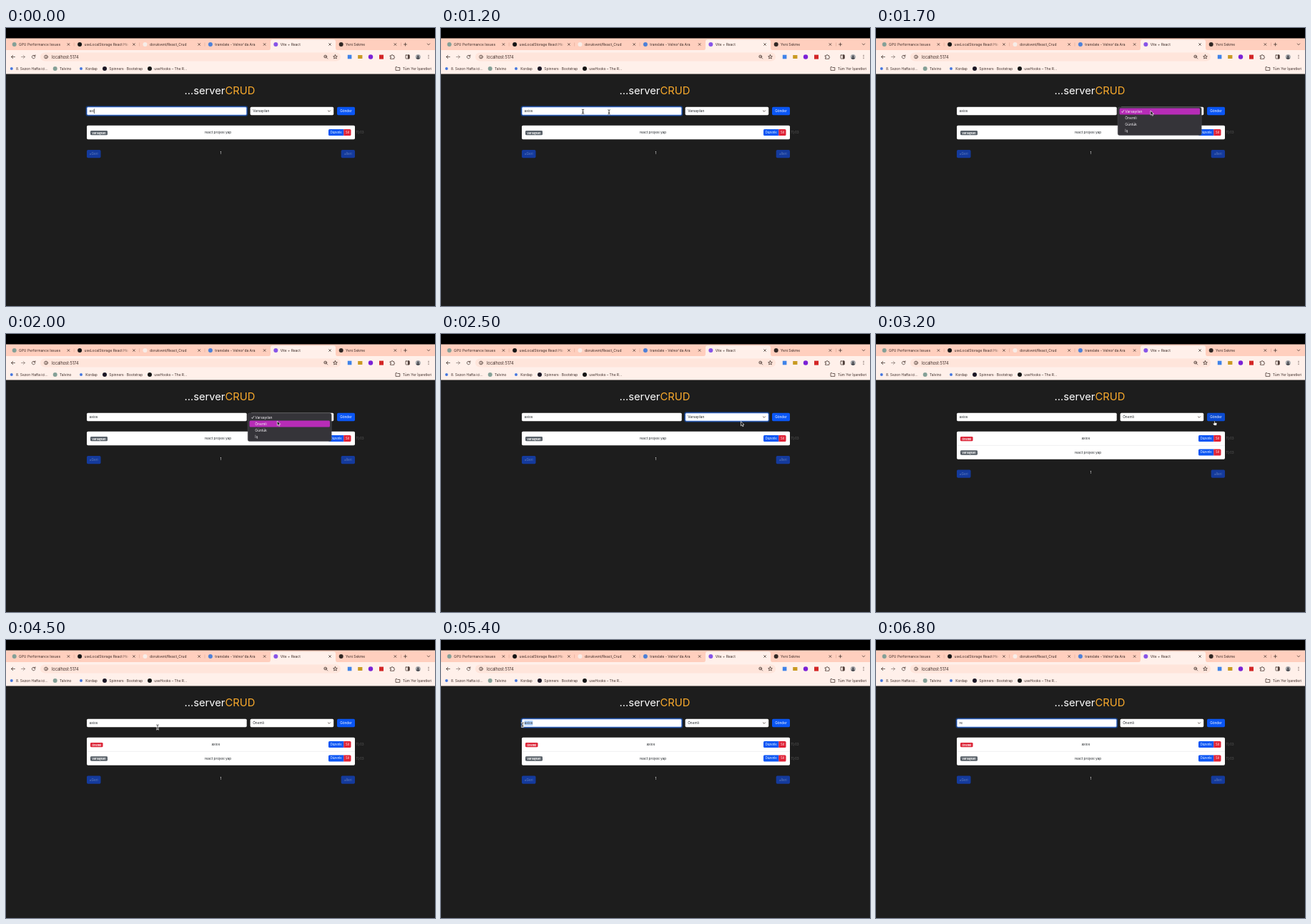
Animation, 600 px wide and 390 px high, one loop 7 s. Source, as an HTML page:

```html
<!DOCTYPE html>
<html lang="tr">
<head>
<meta charset="utf-8">
<title>CRUD</title>
<style>
html, body { margin: 0; width: 100%; height: 100%; overflow: hidden; background: #1d1d1d; }
svg { display: block; width: 100vw; height: 100vh; }
text { font: 4.75px Inter, Roboto, sans-serif; fill: #212529; white-space: pre; }
.chrome text { font-size: 4.9px; fill: #3a2a26; }
.chrome .url { font-size: 5.6px; }
.icon { fill: none; stroke: #40302b; stroke-width: .75; stroke-linecap: round; stroke-linejoin: round; }
.title { font-size: 14.7px; fill: #fff; }
.mid { text-anchor: middle; }
.light { fill: #fff; }
.badge { font-size: 3.75px; font-weight: 700; fill: #fff; text-anchor: middle; }
.small { font-size: 4.2px; fill: #fff; text-anchor: middle; }
.date { font-size: 4.6px; fill: #595959; }
.dim { font-size: 4.7px; fill: #6680bd; text-anchor: middle; }
.menu text { font-size: 5px; fill: #f4f2f5; }
.ring { fill: none; stroke: #0d6efd; stroke-opacity: .35; stroke-width: 2; }
.ring + .edge { fill: none; stroke: #2a62dc; stroke-width: .6; }
</style>
</head>
<body>
<svg viewBox="0 0 600 390" preserveAspectRatio="none">
  <defs>
    <linearGradient id="fade">
      <stop stop-color="#ffcfbe" stop-opacity="0"/><stop offset="1" stop-color="#ffcfbe"/>
    </linearGradient>
    <g id="ibeam" fill="none" stroke-linecap="round">
      <path id="beam" d="M-1.3-3.2Q0-3.2 0-2.4Q0-3.2 1.3-3.2M0-2.4V2.4M-1.3 3.2Q0 3.2 0 2.4Q0 3.2 1.3 3.2M-.8 .8H.8" stroke="#fff" stroke-width="1.5"/>
      <use href="#beam"/>
      <path d="M-1.3-3.2Q0-3.2 0-2.4Q0-3.2 1.3-3.2M0-2.4V2.4M-1.3 3.2Q0 3.2 0 2.4Q0 3.2 1.3 3.2M-.8 .8H.8" stroke="#222" stroke-width=".75"/>
    </g>
    <path id="arrow" d="M0 0V6.2L1.5 4.9L2.5 7.2L3.6 6.7L2.6 4.5H4.5Z" fill="#111" stroke="#fff" stroke-width=".65"/>
    <path id="hand" d="M-.6 3.6V.3Q0-.5.6.3V2.4L3 3Q3.5 3.2 3.4 4L2.9 6.5H-.6L-2.4 4.2Q-2.5 3.2-1.6 3.4Z" fill="#fff" stroke="#111" stroke-width=".6"/>
  </defs>

  <rect width="600" height="390" fill="#1d1d1d"/>
  <rect width="600" height="14.5" fill="#000"/>

  <g class="chrome">
    <rect y="14.5" width="600" height="17" fill="#ffcfbe"/>
    <rect y="31" width="600" height="33.5" fill="#fff0ea"/>
    <path d="M367 31.2Q370 31 370 28V19Q370 16.3 373 16.3H458Q461 16.3 461 19V28Q461 31 464 31.2Z" fill="#fff0ea"/>
    <rect x="48" y="34.5" width="420" height="12" rx="6" fill="#ffe5db"/>
    <g id="tabs"></g>
    <rect x="164" y="18" width="10" height="10" fill="url(#fade)"/>
    <rect x="173.5" y="18" width="3" height="10" fill="#ffcfbe"/>
    <path class="icon" d="M556.5 23H560.5M558.5 21V25M589.3 22L591 23.8L592.7 22"/>

    <path class="icon" d="M12.3 40.5H7.5M9.7 38.3L7.5 40.5L9.7 42.7"/>
    <path class="icon" stroke-opacity=".6" d="M21.5 40.5H26.3M24.1 38.3L26.3 40.5L24.1 42.7"/>
    <path class="icon" d="M40.6 39.4A2.3 2.3 0 1 0 40.8 41.2M40.9 37.8V39.6H39.1"/>
    <circle class="icon" cx="56" cy="40.5" r="2.4"/><path class="icon" d="M56 40.3V41.7M56 39.2V39.2"/>
    <text class="url" x="64" y="42.5">localhost:5174</text>
    <g class="icon">
      <circle cx="446.7" cy="40" r="1.9"/><path d="M448.2 41.5L449.7 43M445.9 40H447.5"/>
      <path d="M460.5 37.6L461.3 39.5L463.3 39.7L461.8 41L462.3 43L460.5 41.9L458.7 43L459.2 41L457.7 39.7L459.7 39.5Z"/>
      <path d="M537.5 38.7H539.2Q539.3 37.2 540.3 37.4Q541 37.6 541 38.7H542.7V40.2Q543.9 40.4 543.7 41.3Q543.5 41.8 542.7 41.8V43.3H537.5V41.9Q538.8 41.8 538.8 41Q538.7 40.2 537.5 40.2Z"/>
      <rect x="559" y="38" width="5.2" height="5" rx=".5"/><path d="M562.3 38.2V42.8H563.9V38.2Z" fill="#40302b"/>
      <path stroke-width="1.1" d="M591 38.4V38.4M591 40.5V40.5M591 42.6V42.6"/>
      <path d="M545 59V54.7H547L547.7 55.5H550.8V59Z"/>
    </g>
    <rect x="477.8" y="37.7" width="5.6" height="5.6" fill="#3f83e8"/>
    <rect x="492.2" y="38" width="6.2" height="5" fill="#c99a22"/>
    <circle cx="510" cy="40.5" r="3.2" fill="#7b21d6"/>
    <rect x="522" y="37.6" width="6" height="6" fill="#d32626"/>
    <circle cx="576.3" cy="40.5" r="3.5" fill="#a4a6aa"/>
    <path d="M573.7 42.8Q574 41 576.3 41Q578.6 41 578.9 42.8Q576.3 45 573.7 42.8Z" fill="#47494f"/>
    <circle cx="576.3" cy="39.8" r="1.3" fill="#47494f"/>
    <path d="M552.5 20.5V25.5" stroke="#d49c8b" stroke-width=".5"/>
    <g id="bookmarks"></g>
    <text x="554.8" y="58.7">Tüm Yer İşaretleri</text>
  </g>

  <text class="title" x="249.5" y="93.3">...server</text>
  <text class="title" x="306.6" y="93.3" style="fill:#fbab2c">CRUD</text>

  <rect x="113" y="110.8" width="223.7" height="11.4" rx="1.6" fill="#fff"/>
  <g id="inputFocus"><rect class="ring" x="112.5" y="110.3" width="224.7" height="12.4" rx="2"/><rect class="edge" x="113" y="110.8" width="223.7" height="11.4" rx="1.6"/></g>
  <rect id="selection" y="113" height="7" fill="#b3d4fd"/>
  <text id="typed" x="116.6" y="118.2"></text>
  <path id="caret" d="M0 113.3V120" stroke="#111" stroke-width=".6"/>

  <rect x="341.6" y="110.8" width="116.6" height="11.4" rx="1.6" fill="#fff"/>
  <g id="selectFocus"><rect class="ring" x="341.1" y="110.3" width="117.6" height="12.4" rx="2"/><rect class="edge" x="341.6" y="110.8" width="116.6" height="11.4" rx="1.6"/></g>
  <text id="choice" x="345.2" y="118.2"></text>
  <path class="icon" d="M450.4 115.8L452 117.4L453.6 115.8"/>
  <rect id="send" x="463" y="110.8" width="25" height="11.4" rx="1.7"/>
  <text class="mid light" x="475.5" y="118.2">Gönder</text>

  <rect id="card" x="113" y="136.7" width="375" rx="1.7" fill="#fff"/>
  <g id="newRow"></g>
  <g id="oldRow"></g>
  <g id="pager">
    <rect x="113" y="171" width="19.5" height="11.3" rx="1.7" fill="#143a9c"/>
    <text class="dim" x="122.7" y="178.3">«Geri</text>
    <text class="mid light" x="300.5" y="176.6">1</text>
    <rect x="468.7" y="171" width="19.3" height="11.3" rx="1.7" fill="#143a9c"/>
    <text class="dim" x="478.3" y="178.3">»İleri</text>
  </g>

  <g id="menu" class="menu">
    <rect x="338.2" y="111" width="117" height="39.5" rx="2.5" fill="#353439" stroke="#55545a" stroke-width=".5"/>
    <rect id="hover" x="340.5" width="112.5" height="9" rx="1.5" fill="#b72cb7"/>
    <path d="M343.4 117.2L344.6 118.6L346.6 115.3" fill="none" stroke="#fff" stroke-width=".75"/>
    <text x="348.3" y="118.7">Varsayılan</text>
    <text x="348.3" y="127.7">Önemli</text>
    <text x="348.3" y="136.7">Günlük</text>
    <text x="348.3" y="145.7">İş</text>
  </g>

  <use id="trail" href="#ibeam" x="198.5" y="117.3"/>
  <use id="pointer"/>
</svg>

<script>
const LOOP = 7000, STEP = 100;
const $ = id => document.getElementById(id);
const show = (id, on) => $(id).setAttribute("visibility", on ? "visible" : "hidden");
const set = (id, attrs) => { for (const key in attrs) $(id).setAttribute(key, attrs[key]); };
const dot = (x, y, r, color) => `<circle cx="${x}" cy="${y}" r="${r}" fill="${color}"/>`;
const label = (x, y, text) => `<text x="${x}" y="${y}">${text}</text>`;

const tabs = [
  ["GPU Performance Issues", "#84a097"],
  ["useLocalStorage React Ho", "#151515"],
  ["dorukvent/React_Crud", "#f7ede8"],
  ["translate - Velnor'da Ara", "#4d80d8"],
  ["Vite + React", "#8654e8"],
  ["Yeni Sekme", "#302724"]
];
$("tabs").innerHTML = tabs.map(([name, color], i) => {
  const x = 11.7 + i * 91.4, close = x + 75.7;
  const divider = i < 3 ? `<path d="M${x + 83.5} 20.5V25.5" stroke="#d49c8b" stroke-width=".5"/>` : "";
  return dot(x, 23, 3, color) + label(x + 6.4, 24.8, name) + divider +
    `<path class="icon" d="M${close - 1.4} 21.6l2.8 2.8m0-2.8l-2.8 2.8"/>`;
}).join("");

const bookmarks = [
  [7.8, "8. Sezon Hafta ici...", "#4778df"],
  [68.7, "Talvino", "#84a097"],
  [105, "Kordap", "#4778df"],
  [138, "Spinners · Bootstrap", "#1c1726"],
  [201, "useHooks – The R...", "#151515"]
];
$("bookmarks").innerHTML = bookmarks.map(([x, name, color]) =>
  dot(x, 57, color === "#4778df" ? 2 : 3, color) + label(x + 6.3, 58.7, name)).join("");

const row = (name, tag, color, width) => `
  <rect x="118" y="143.9" width="${width}" height="6.4" rx="1.4" fill="${color}"/>
  <text class="badge" x="${118 + width / 2}" y="148.5">${tag}</text>
  <path d="M452.5 142H472.3V151H452.5Q451 151 451 149.5V143.5Q451 142 452.5 142Z" fill="#0a56f4"/>
  <path d="M472.3 142H481Q482.5 142 482.5 143.5V149.5Q482.5 151 481 151H472.3Z" fill="#df2236"/>
  <text class="small" x="461.7" y="148.1">Düzenle</text>
  <text class="small" x="477.4" y="148.1">Sil</text>
  <text class="mid" x="${name === "axios" ? 293.3 : 296.5}" y="148.3">${name}</text>
  <text class="date" x="489.5" y="148.4">11/03</text>`;
$("newRow").innerHTML = row("axios", "Önemli", "#dc2437", 17.5) +
  `<path d="M113 156.3H488" stroke="#dedfe1" stroke-width=".5"/>`;
$("oldRow").innerHTML = row("react projesi yap", "Varsayılan", "#575f67", 24);

// time, x, y of the pointer's hot spot
const path = [
  [1200, 235, 118], [1500, 384, 116], [1700, 384, 116], [2000, 379.3, 122],
  [2300, 379.3, 122], [2700, 459.5, 123.3], [2900, 473.5, 121.8], [3700, 473.5, 121.8],
  [4500, 212, 122.2], [4900, 130, 118.5], [5100, 130, 118.5], [5600, 103.5, 119.5], [7000, 103.5, 119.5]
];
function pointerAt(t) {
  const next = Math.max(1, path.findIndex(p => p[0] > t));
  const [t0, x0, y0] = path[next - 1], [t1, x1, y1] = path[next];
  const k = Math.max(0, (t - t0) / (t1 - t0));
  return [x0 + (x1 - x0) * k, y0 + (y1 - y0) * k];
}

const between = (t, from, to) => t >= from && t < to;
const textAt = t =>
  t < 300 ? "axi" : t < 400 ? "axio" : t < 6200 ? "axios" : t < 6400 ? "" : t < 6500 ? "r" : "re";

function draw(t) {
  const [x, y] = pointerAt(t);
  const added = t >= 3100, shift = added ? 19.4 : 0;

  $("typed").textContent = textAt(t);
  const textEnd = 116.6 + $("typed").getComputedTextLength();
  set("caret", { transform: `translate(${textEnd + .4} 0)` });
  show("caret", t < 800 || between(t, 1300, 1700) || between(t, 5000, 5200) || between(t, 6200, 6800));
  show("inputFocus", t < 1700 || t >= 5000);

  const start = Math.min(textEnd, Math.max(116.6, x));
  set("selection", { x: start, width: textEnd - start });
  show("selection", between(t, 5200, 6200));

  $("choice").textContent = t < 2800 ? "Varsayılan" : "Önemli";
  show("selectFocus", between(t, 2400, 3000));
  show("menu", between(t, 1700, 2400));
  set("hover", { y: t < 1900 ? 112.5 : 121.5 });
  set("send", { fill: between(t, 2900, 3800) ? "#0b4bd0" : "#0a56f4" });

  set("card", { height: 19.6 + shift });
  show("newRow", added);
  set("oldRow", { transform: `translate(0 ${shift})` });
  set("pager", { transform: `translate(0 ${shift})` });

  const kind = x < 337 ? "ibeam" : x < 463 ? "arrow" : "hand";
  set("pointer", { href: "#" + kind, x, y });
  show("pointer", between(t, 1200, 6200));
  show("trail", between(t, 1200, 1300));
}

function frame() {
  draw(Math.floor(performance.now() % LOOP / STEP) * STEP);
  requestAnimationFrame(frame);
}
frame();
</script>
</body>
</html>
```
